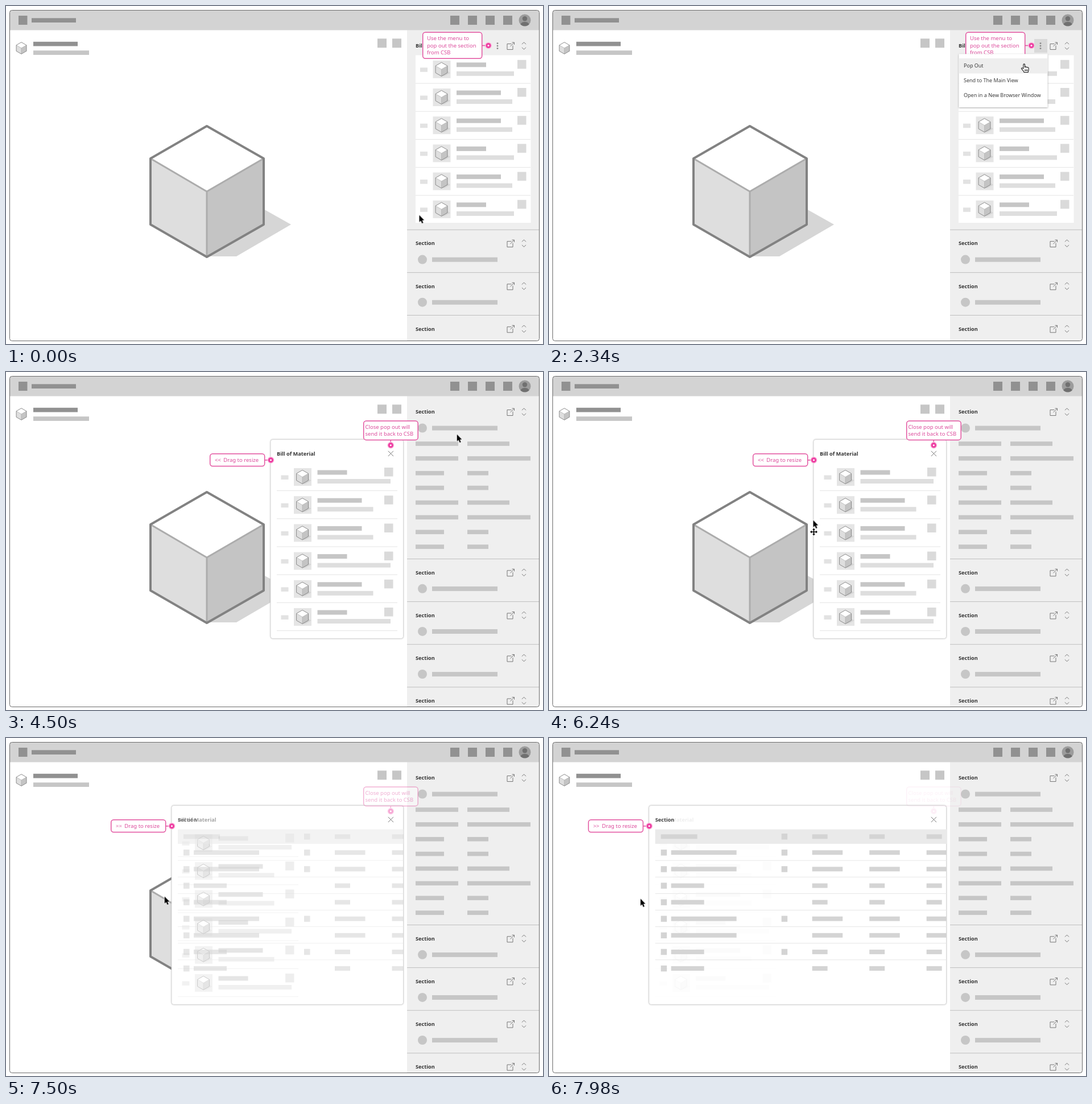
These frames come from a looping animation (944x594 px, 8 s). An HTML page:

```html
<!DOCTYPE html>
<html lang="en">
<head>
<meta charset="utf-8">
<title>Pop out a section</title>
<style>
html, body { margin: 0; width: 100%; height: 100%; overflow: hidden; background: #fff; }
svg { display: block; width: 944px; height: 594px; }
text { font: 400 9px "Noto Sans", "Open Sans", sans-serif; fill: #3c3c3c; }
.title { font-weight: 600; font-size: 9.2px; fill: #333; }
.note text { font-weight: 500; font-size: 9.5px; fill: #dc4a9b; }
.line { fill: none; stroke: #777; }

.anim { animation: 8s linear infinite; }
#arrow { animation-name: arrow-move; }
#arrow path { animation-name: arrow-show; }
#hand { animation-name: hand-move; }
#hand path { animation-name: hand-show; }
#cross { animation-name: cross; }
#menu { animation-name: menu; }
#hover { animation-name: hover; }
#popped { animation-name: popped; }
#panel { animation-name: widen; }
.drag { animation-name: drag; }
.out { animation-name: fade-out; }
.in { animation-name: fade-in; }

@keyframes arrow-move {
  0% { transform: translate(726.5px, 367.5px); animation-timing-function: ease-out; }
  11%, 45% { transform: translate(868px, 77px); }
  45.01%, 54.4% { transform: translate(804px, 105px); animation-timing-function: ease-in; }
  56.25% { transform: translate(793px, 109.5px); animation-timing-function: cubic-bezier(.3, .2, .4, .95); }
  64.5% { transform: translate(506px, 227px); animation-timing-function: ease-out; }
  72%, 74% { transform: translate(485px, 243px); animation-timing-function: ease-out; }
  78%, 80% { transform: translate(464.5px, 260.5px); animation-timing-function: ease-out; }
  86.25%, 87.75% { transform: translate(461.5px, 281px); animation-timing-function: cubic-bezier(.3, .4, .7, .8); }
  90.75% { transform: translate(352px, 278.5px); animation-timing-function: cubic-bezier(.33, .38, .67, .71); }
  93.75% { transform: translate(279px, 278.5px); animation-timing-function: cubic-bezier(.33, .41, .67, .77); }
  99.75% { transform: translate(161px, 282.5px); }
  100% { transform: translate(157.5px, 282.5px); }
}
@keyframes arrow-show { 0%, 10.5% { opacity: 1; } 11.2%, 45.5% { opacity: 0; } 46.5%, 100% { opacity: 1; } }
@keyframes hand-show { 0%, 10.5% { opacity: 0; } 11.2%, 45.5% { opacity: 1; } 46.5%, 100% { opacity: 0; } }
@keyframes hand-move {
  0%, 26.25% { transform: translate(864px, 76px); animation-timing-function: cubic-bezier(.2, .4, .6, .9); }
  29.25% { transform: translate(830px, 101px); animation-timing-function: ease-out; }
  34.5%, 100% { transform: translate(802px, 104px); }
}
@keyframes cross { 0%, 74% { opacity: 0; } 78%, 80.25% { opacity: 1; } 86%, 100% { opacity: 0; } }
@keyframes menu { 0%, 17.5% { opacity: 0; } 21%, 100% { opacity: 1; } }
@keyframes hover { 0%, 26.4% { opacity: 0; } 28.5%, 100% { opacity: 1; } }
@keyframes popped { 0%, 45.3% { opacity: 0; } 46.5%, 100% { opacity: 1; } }

/* the resize is still easing out when the loop ends */
@keyframes drag {
  0%, 87.75% { transform: none; animation-timing-function: cubic-bezier(0, 0, .517, .753); }
  100% { transform: translateX(-292.3px); }
}
@keyframes widen {
  0%, 87.75% { x: 465px; width: 233.5px; animation-timing-function: cubic-bezier(0, 0, .517, .753); }
  100% { x: 172.7px; width: 525.8px; }
}
@keyframes fade-out {
  0%, 87.75% { opacity: 1; animation-timing-function: cubic-bezier(0, 0, .517, .753); }
  100% { opacity: .072; }
}
@keyframes fade-in {
  0%, 87.75% { opacity: 0; animation-timing-function: cubic-bezier(0, 0, .517, .753); }
  100% { opacity: .928; }
}
</style>
</head>
<body>
<svg id="stage" viewBox="0 0 944 594"></svg>
<script>
const DARK = '#919191', MID = '#c6c6c6', LIGHT = '#dedede', PINK = '#e2529f';

const rect = (x, y, w, h, fill, more = '') =>
  `<rect x="${x}" y="${y}" width="${w}" height="${h}" fill="${fill}" ${more}/>`;
const dot = (x, y, r, fill) => `<circle cx="${x}" cy="${y}" r="${r}" fill="${fill}"/>`;
const rule = (x1, x2, y, color) => `<path d="M${x1} ${y}H${x2}" stroke="${color}"/>`;
const text = (x, y, s, cls = '') => `<text x="${x}" y="${y}" class="${cls}">${s}</text>`;
const repeat = (n, fn) => Array.from({ length: n }, (_, i) => fn(i)).join('');

// Isometric cube around (x, y); the edge widths are in stage pixels.
function cube(x, y, k, outer, inner, shadow) {
  return `<g transform="translate(${x} ${y}) scale(${k})" stroke-linejoin="round">
    ${shadow ? '<path d="M100 31L148 58L52 114H0Z" fill="#d6d6d6"/>' : ''}
    <path d="M0-115L100-58L0 0L-99-58Z" fill="#fff"/>
    <path d="M-99-58L0 0V115L-99 58Z" fill="#dedede"/>
    <path d="M100-58L0 0V115L100 58Z" fill="#c4c4c4"/>
    <path d="M-99-58L0 0L100-58M0 0V115" fill="none" stroke="#acacac" stroke-width="${inner / k}"/>
    <path d="M0-115L100-58V58L0 115L-99 58V-58Z" fill="none" stroke="#828282" stroke-width="${outer / k}"/>
  </g>`;
}

const popIcon = y => `<path class="line" d="M888.5 ${y - 3.5}H881V${y + 6.5}H891V${y - .5}M886.5 ${y + 1}L893.5 ${y - 6}M889.5 ${y - 6}H893.5V${y - 2}"/>`;
const chevrons = y => `<path class="line" d="M907 ${y - 2.8}L910.5 ${y - 6.3}L914 ${y - 2.8}M907 ${y + 2.8}L910.5 ${y + 6.3}L914 ${y + 2.8}"/>`;
const head = (y, label) => text(720, y + 3.3, label, 'title') + popIcon(y) + chevrons(y);
const section = y => head(y, 'Section') + dot(732, y + 28.5, 8, MID) + rect(749, y + 24.6, 115, 8, MID);
const sections = (y, n) => repeat(n, i =>
  rule(705, 937, y + i * 75.1, '#bfbfbf') + section(y + 23.8 + i * 75.1));

const longRow = i => [1, 2, 4].includes(i);

// One part of the materials list; `sub` is the width of the second bar.
function part(i, x, y, sub, squareX) {
  return rect(x, y + 21.5, 13, 7.5, '#e2e2e2') +
    rect(x + 22.5, y + 9, 31, 31, '#e5e5e5') + cube(x + 37.5, y + 24.5, .105, .9, .6, true) +
    rect(x + 64, y + 12.5, longRow(i) ? 78 : 52, 8, MID) +
    rect(x + 64, y + 28, sub, 8, LIGHT) +
    rect(squareX, y + 8, 15.5, 15.5, '#dadada');
}

function pin(x, y) {
  return dot(x, y, 6, '#f9c3e0') + dot(x, y, 4.6, '#ee3fa3') + dot(x, y, 1.5, '#fff');
}
const bubble = (x, y, w, h) =>
  rect(x, y, w, h, '#fff', `rx="4.5" stroke="${PINK}" stroke-width="1.5"`);
const link = d => `<path d="${d}" stroke="${PINK}" stroke-width="1.5"/>`;

const header = rect(7, 8, 930, 34.5, '#d3d3d3') +
  rect(22, 17, 15.5, 16, DARK) + rect(45, 21.3, 78, 7.7, DARK) +
  repeat(4, i => rect(781 + i * 31, 17, 16, 16, DARK)) +
  dot(912, 25, 10.5, '#9c9c9c') + dot(912, 22.2, 4.2, '#707070') +
  '<path d="M904.5 32.2C905.5 26.5 918.5 26.5 919.5 32.2A10.5 10.5 0 0 1 904.5 32.2Z" fill="#707070"/>';

const main = cube(27, 74, .09, .9, .7) +
  rect(48, 62.8, 78, 7.7, DARK) + rect(48, 78.2, 98, 7.7, MID) +
  rect(653, 57.3, 16, 16, MID) + rect(679, 57.3, 16, 16, MID) +
  cube(353, 326, 1, 4, 3, true);

const sidebar = rect(705, 42.5, 232, 546, '#efefef');

const docked = sidebar + head(70, 'Bill of Material') +
  rect(720, 86.5, 202.5, 294.5, '#fff') +
  repeat(6, i => {
    const y = 86.8 + i * 49.2;
    return part(i, 728, y, longRow(i) ? 98 : 101, 899) + (i ? rule(720, 922, y, '#e4e4e4') : '');
  }) +
  sections(393.3, 3) +
  `<g class="note">${bubble(732.7, 46.2, 104, 46)}${link('M837 69.5H844')}${pin(848, 69.5)}
    ${text(740, 60, 'Use the menu to')}${text(740, 72.5, 'pop out the section')}${text(740, 84.5, 'from CSB')}</g>`;

const menu = `<g id="menu" class="anim">
    ${rect(853, 58, 23, 24, '#d9d9d9')}
    <g style="filter:drop-shadow(0 1px 1.5px #0005)">${rect(720.5, 84.3, 156, 93.7, '#fff')}</g>
    <g id="hover" class="anim">${rect(720.5, 92, 156, 26.5, '#eee')}</g>
    ${['Pop Out', 'Send to The Main View', 'Open in a New Browser Window']
      .map((s, i) => text(729, 108.3 + i * 25.8, s)).join('')}
  </g>` + repeat(3, i => dot(864, 65.6 + i * 4.5, 1.4, '#858585'));

const details = section(70) + repeat(8, i => {
  const y = 122.2 + i * 25.87;
  return rect(720, y, i % 4 < 2 ? 75 : 50, 7.6, MID) +
    rect(811, y, [74, 111, 37, 37][i % 4], 7.6, MID);
});

const list = `<g class="anim out">${text(476, 146.6, 'Bill of Material', 'title')}` +
  repeat(6, i => {
    const y = 160 + i * 49.2;
    return part(i, 483.5, y, longRow(i) ? 98 : 128.5, 665) + rule(476, 688, y + 48.6, '#e4e4e4');
  }) + '</g>';

// Wide table, laid out from the panel's left edge.
const INK = '#d1d1d1';
const table = `<g class="anim in"><g transform="translate(465 0)">
  ${text(11, 146.6, 'Section', 'title')}
  ${rect(11, 160.5, 620, 25.5, '#e9e9e9')}${rect(21, 169.3, 64, 8, INK)}${rect(233, 168, 10.5, 10.5, INK)}
  ${repeat(3, c => rect(287 + c * 100.5, 169.3, 27, 8, INK))}
  ${repeat(8, i => {
    const y = 201.3 + i * 29.1, wide = i % 4 < 2;
    return rect(21, y - 5.2, 10.5, 10.5, INK) + rect(39, y - 4, wide ? 115 : 58, 8, INK) +
      ([0, 1, 4, 6].includes(i) ? rect(233, y - 5.2, 10.5, 10.5, INK) : '') +
      repeat(3, c => rect(287 + c * 100.5, y - 4, wide ? 53.5 : 27, 8, INK)) +
      (i < 7 ? rule(11, 631, y + 13.9, '#e4e4e4') : '');
  })}</g></g>`;

const popped = `<g id="popped" class="anim">
  ${sidebar}${details}${sections(328.5, 4)}
  <rect id="panel" class="anim" x="465" y="118.5" width="233.5" height="350" rx="4" fill="#fff"
    stroke="#d6d6d6" style="filter:drop-shadow(0 0 1px #0003)"/>
  <g clip-path="url(#edge)"><g class="anim drag">${list}${table}</g></g>
  <path class="line" d="M671.8 138.8L681 148M681 138.8L671.8 148"/>
  <g class="note anim out">${bubble(628.7, 86, 95.5, 33.4)}${link('M676.3 119.5V124.5')}${pin(676.3, 128.7)}
    ${text(631.5, 99.8, 'Close pop out will')}${text(631.5, 111.8, 'send it back to CSB')}</g>
  <g class="note anim drag">${bubble(358.7, 143.7, 96, 21.8)}${link('M455 154.8H461')}${pin(465.5, 154.8)}
    <g class="anim out">${text(367, 158, '&lt;&lt;')}</g><g class="anim in">${text(367, 158, '&gt;&gt;')}</g>
    ${text(382.3, 158, 'Drag to resize')}</g>
</g>`;

const cursors = `
  <g id="cross" class="anim"><path transform="translate(465.5 281)" fill="#000" stroke="#fff" stroke-width="1" paint-order="stroke"
    d="M0-6.5L2.5-3.6H.8V-.8H3.6V-2.5L6.5 0L3.6 2.5V.8H.8V3.6H2.5L0 6.5L-2.5 3.6H-.8V.8H-3.6V2.5L-6.5 0L-3.6-2.5V-.8H-.8V-3.6H-2.5Z"/></g>
  <g id="hand" class="anim"><path class="anim" fill="#fff" stroke="#111" stroke-width="1.1" stroke-linejoin="round"
    d="M4 9V2.2a1.3 1.3 0 0 1 2.6 0V6.5c.3-.9 2.2-.8 2.4.2c.5-.7 2-.6 2.2.4c.8-.5 2 0 2 1.2V11c0 1.5-.9 2.4-1 4.5H5.2C4.5 13 2.5 11.5 1 9.6c-.9-1.2.6-2.5 1.8-1.5ZM6.8 10.5v2.8M8.8 10.5v2.8M10.8 10.5v2.8"/></g>
  <g id="arrow" class="anim"><path class="anim" fill="#000" stroke="#fff" stroke-width="1.4" paint-order="stroke"
    d="M0 0V12.3L2.8 9.7L4.8 14.5L7 13.5L5 8.9H8.7Z"/></g>`;

document.getElementById('stage').innerHTML = `
  <defs>
    <clipPath id="window"><rect x="6.5" y="7.5" width="931" height="581" rx="4"/></clipPath>
    <clipPath id="edge"><rect x="0" y="118" width="698.3" height="350"/></clipPath>
  </defs>
  <g clip-path="url(#window)">${main}${docked}${menu}${popped}${header}</g>
  <rect x="6.5" y="7.5" width="931" height="581" rx="4" fill="none" stroke="#6a6a6a"/>
  ${cursors}`;
</script>
</body>
</html>
```
